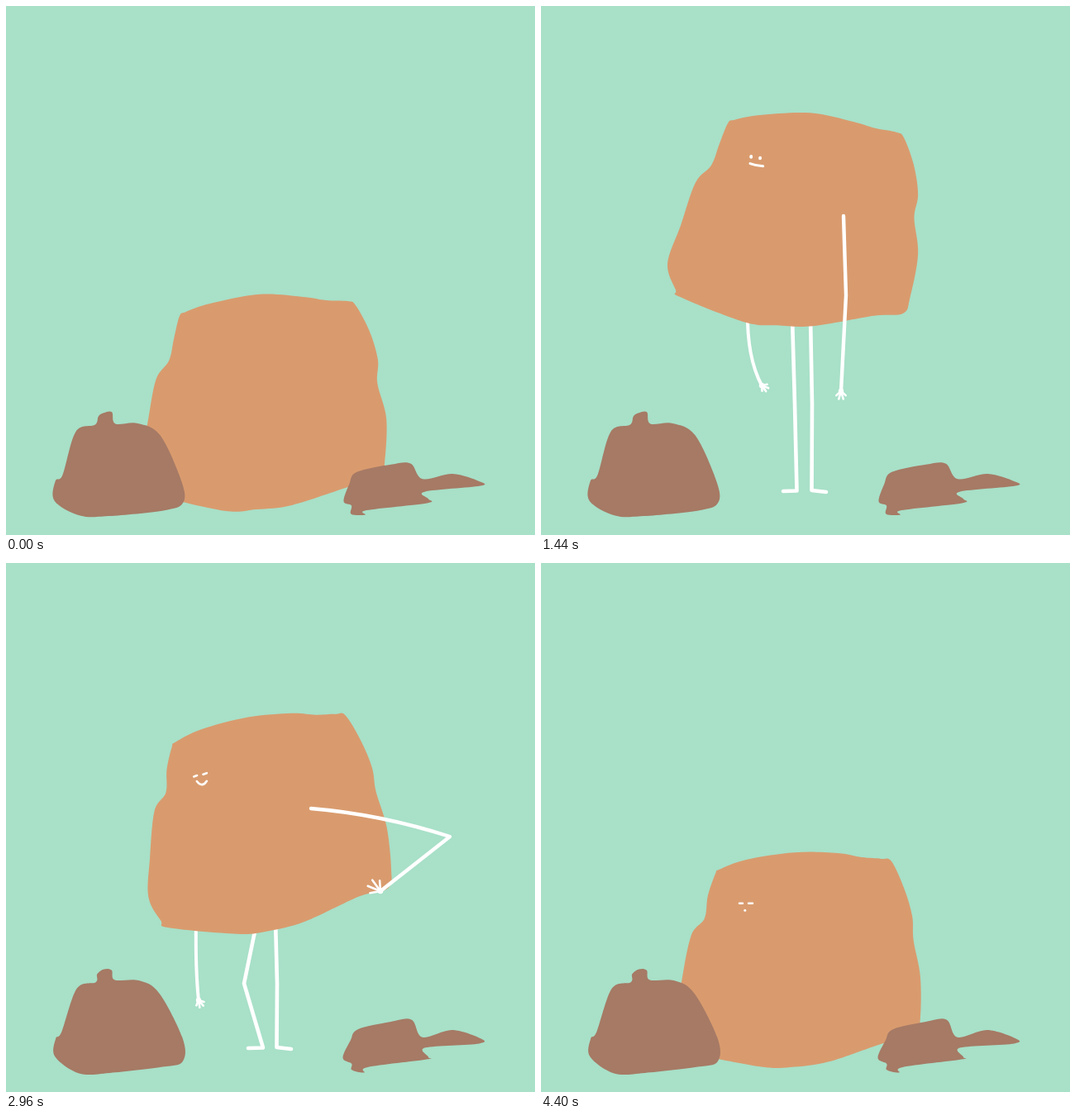
These frames come from a looping animation (640 px wide and 640 px high, 4.48 s). An HTML page with a canvas:

```html
<!DOCTYPE html>
<html lang="en">
<head>
<meta charset="utf-8">
<title>Rock stretch</title>
<style>
html, body { margin: 0; width: 100%; height: 100%; overflow: hidden; background: #a8e0c8; }
canvas { display: block; }
</style>
</head>
<body>
<canvas id="stage" width="640" height="640"></canvas>
<script>
const c = document.getElementById('stage').getContext('2d');
const STEP = 80, STEPS = 56;
const ROCK = '#d99b6e', STONE = '#a67a65', BG = '#a8e0c8';

const rock = [
  208,204, 214,199, 245,188, 304,178, 357,180, 385,184.5, 410,186, 421,190, 437,222, 447,256,
  447.5,285, 457,328, 456,380, 450,402, 415,409, 345,432, 300,438, 262,438.5, 181,421,
  173,412, 160,382, 168,335, 179,280, 195,258, 200,231
];
const leftStone = [
  108,507, 111,497, 118,492, 128,492, 132,505, 160,505, 186,520, 213,575, 214,602,
  190,610, 125,617, 89,617, 59,598, 60,575, 68,567, 85,515
];
const rightStone = [
  425,564, 465,555, 490,553, 504,573, 540,565.5, 573,575, 573,581, 507,587,
  511,597, 509,601, 437,610, 434,616, 418,614, 418,605, 408,599, 416,578
];

// Body: x, y, tilt, knee bend
const sit = [2.5, 171.5, 0, 0], up = [2.5, -48.5, 8.2, 0], stand = [0, 0, 0, 0], lean = [3, 6.5, -6.2, -19];
// Front arm: shoulder, elbow, wrist, hand angle, finger length
const hang = [366, 302, 368, 410, 363, 515, 90, 9];
const reach = [366, 254, 369, 350, 363, 466, 90, 9];
const akimbo = [366, 302, 494, 333, 416, 417, 122, 14];
const proud = [369, 297, 537, 331, 453, 397, 218, 15];
const swing = [365, 293, 378, 390, 389, 505, 85, 9];
// Back arm: bend, wrist, hand angle
const rest = [226, 475, 231, 513, 72], low = [229, 490, 233, 529, 65];
const lift = [249, 425, 267, 459, 38], tuck = [230, 525, 232, 555, 72];

const keys = [
  [0, sit, hang, tuck],
  [15, sit, hang, tuck],
  [18, up, reach, lift],
  [20, stand, hang, rest],
  [23, stand, hang, rest],
  [26, stand, akimbo, rest],
  [27, stand, akimbo, rest],
  [30, lean, proud, low],
  [38, lean, proud, low],
  [41, stand, akimbo, rest],
  [44, stand, swing, rest],
  [47, stand, hang, rest],
  [50, sit, hang, tuck],
  [STEPS, sit, hang, tuck]
];

function poseAt(n) {
  const i = keys.findIndex(k => k[0] > n);
  const a = keys[i - 1], b = keys[i];
  let t = (n - a[0]) / (b[0] - a[0]);
  if (b[1] === sit) t = t ** 0.7;
  return [1, 2, 3].map(p => a[p].map((v, j) => v + (b[p][j] - v) * t));
}

// Smooth closed outline; odd drawings are nudged by a hand-drawn wobble.
function blob(points, color, odd) {
  const p = points.map((v, i) => v + (odd ? 1 : -1) * 0.7 * Math.sin(i * 1.9 + 1));
  const n = p.length, at = i => p[(i + n) % n];
  const out = i => at(i) + (at(i + 2) - at(i - 2)) / 6;
  const into = i => at(i) - (at(i + 2) - at(i - 2)) / 6;
  c.beginPath();
  c.moveTo(p[0], p[1]);
  for (let i = 0; i < n; i += 2) {
    c.bezierCurveTo(out(i), out(i + 1), into(i + 2), into(i + 3), at(i + 2), at(i + 3));
  }
  c.fillStyle = color;
  c.fill();
}

function line(width, ...p) {
  c.lineWidth = width;
  c.beginPath();
  for (let i = 0; i < p.length; i += 2) c.lineTo(p[i], p[i + 1]);
  c.stroke();
}

function curve(width, x, y, cx, cy, ex, ey) {
  c.lineWidth = width;
  c.beginPath();
  c.moveTo(x, y);
  c.quadraticCurveTo(cx, cy, ex, ey);
  c.stroke();
}

function dot(x, y, rx, ry = rx) {
  c.beginPath();
  c.ellipse(x, y, rx, ry, 0, 0, 7);
  c.fill();
}

function hand(x, y, angle, size) {
  dot(x, y, 3.2);
  for (let i = 0; i < 4; i++) {
    const a = (angle - 48 + i * 32) * Math.PI / 180, r = size * (i % 3 ? 1.1 : 0.85);
    line(2.6, x, y, x + r * Math.cos(a), y + r * Math.sin(a));
  }
}

function legs([, y, , knee], odd) {
  const top = 425 + y, mid = (top + 586) / 2, ankle = odd ? 311 : 309.5;
  line(4.6, 304, top, 307 + knee, mid, ankle, 586.5, 293, 587);
  line(4.6, 326, top, 328, mid, 327.5, 586, 345, 588);
}

function backArm([mx, my, wx, wy, angle]) {
  curve(4, mx + 1, my - 55, mx, my, wx, wy);
  hand(wx, wy, angle, 8);
}

function frontArm([sx, sy, ex, ey, wx, wy, angle, size]) {
  const bow = Math.abs(ex - sx) * 0.06;
  c.lineWidth = 4.4;
  c.beginPath();
  c.moveTo(sx, sy);
  c.quadraticCurveTo((sx + ex) / 2, (sy + ey) / 2 - bow, ex, ey);
  c.lineTo(wx, wy);
  c.stroke();
  hand(wx, wy, angle, size);
}

function face(n) {
  if (n < 9) return;
  if (n < 11 || n >= 50) {
    line(2.4, 237.5, 240.3, 241.5, 240.3);
    line(2.4, 248.5, 240.3, 253.5, 240.3);
    dot(244.3, 248.7, 1.5);
  } else if (n >= 30 && n < 40) {
    line(2.6, 231, 243, 235, 242);
    line(2.6, 242.5, 241.5, 247, 240.5);
    curve(2.6, 234, 249, 239.5, 258, 246, 250);
  } else {
    dot(241, 240, 2, 2.3);
    dot(252, 240, 2, 2.3);
    curve(3, 241, 248.3, 249, 250, 257, 249.3);
  }
}

function draw(n) {
  const odd = n % 2, [body, front, back] = poseAt(n);
  c.fillStyle = BG;
  c.fillRect(0, 0, 640, 640);
  c.lineCap = c.lineJoin = 'round';
  c.strokeStyle = c.fillStyle = '#fff';
  legs(body, odd);
  backArm(back);

  c.save();
  c.translate(310 + body[0], 310 + body[1]);
  c.rotate(body[2] * Math.PI / 180);
  c.translate(-310, -310);
  blob(rock, ROCK, odd);
  c.fillStyle = '#fff';
  face(n);
  c.restore();

  if (n >= 16 && n < 49) frontArm(front);
  blob(leftStone, STONE, odd);
  blob(rightStone, STONE, odd);
}

const start = performance.now();
function tick() {
  draw(Math.floor((performance.now() - start) / STEP) % STEPS);
  requestAnimationFrame(tick);
}
tick();
</script>
</body>
</html>
```
